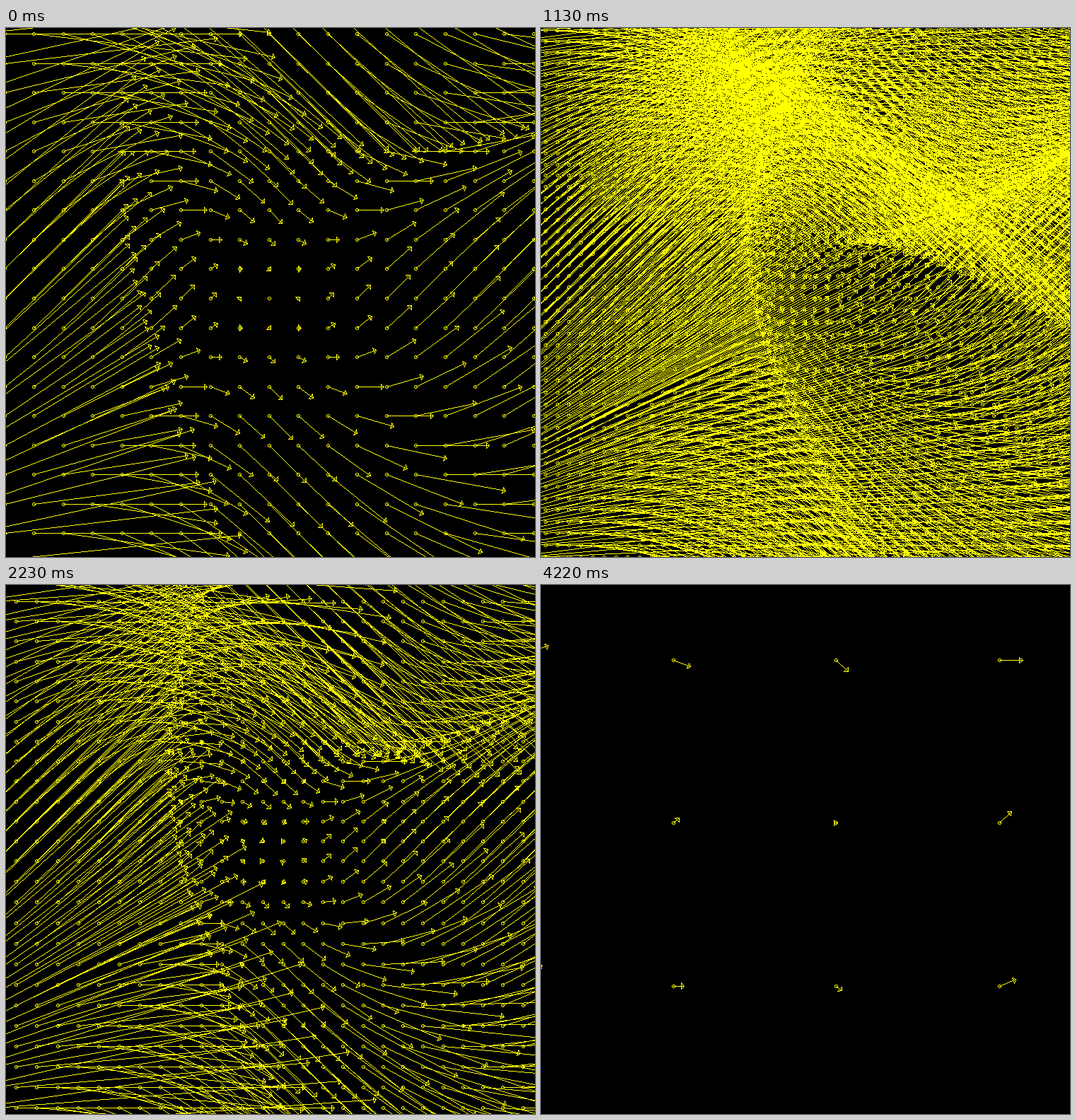
Recreate the animation shown at these times as an HTML page with a canvas. Size 748 px wide and 748 px high, loop 4.44 s.

```html
<!DOCTYPE html>
<html lang="en">
<head>
<meta charset="utf-8">
<title>Vector field</title>
<style>
html, body { margin: 0; width: 100%; height: 100%; overflow: hidden; background: #000; }
canvas { display: block; width: 748px; height: 748px; }
</style>
</head>
<body>
<canvas id="stage" width="748" height="748"></canvas>
<script>
const SIZE = 748, LOOP = 4440;
const SCALE = SIZE / 900;            // pixels per field unit
const CX = 371.7, CY = 382;          // where the field vanishes
const LIMIT = 500, HEAD = 5 * SCALE;
const YELLOW = 0xff00ffff, BLACK = 0xff000000;

// Start time of each picture
const STARTS = [
  0, 120, 230, 350, 460, 570, 670, 790, 910, 1030, 1130, 1230, 1340,
  1450, 1570, 1670, 1790, 1890, 2010, 2120, 2230, 2340, 2450, 2560, 2670, 2770,
  2890, 3000, 3110, 3230, 3330, 3450, 3570, 3670, 3790, 3890, 4000, 4110, 4220
];

// Zoom level (power of 1.1) at a few steps, linear between them
const ZOOM = [[0, 0], [14, -14], [17, -9], [23, 1], [25, 5], [38, 18]];

const ctx = document.getElementById('stage').getContext('2d');
const image = ctx.createImageData(SIZE, SIZE);
const pixels = new Uint32Array(image.data.buffer);

function zoomAt(step) {
  let i = 1;
  while (step > ZOOM[i][0]) i++;
  const [a, from] = ZOOM[i - 1], [b, to] = ZOOM[i];
  return Math.round(from + (to - from) * (step - a) / (b - a));
}

function dot(x, y) {
  if (x >= 0 && y >= 0 && x < SIZE && y < SIZE) pixels[y * SIZE + x] = YELLOW;
}

// Bresenham line without smoothing
function line(ax, ay, bx, by) {
  let x = Math.round(ax), y = Math.round(ay);
  const ex = Math.round(bx), ey = Math.round(by);
  const dx = Math.abs(ex - x), dy = -Math.abs(ey - y);
  const sx = x < ex ? 1 : -1, sy = y < ey ? 1 : -1;
  let err = dx + dy;
  for (;;) {
    dot(x, y);
    if (x === ex && y === ey) return;
    const twice = 2 * err;
    if (twice >= dy) { err += dy; x += sx; }
    if (twice <= dx) { err += dx; y += sy; }
  }
}

function ring(px, py) {
  const x = Math.round(px), y = Math.round(py);
  for (let i = -1; i <= 1; i++) {
    dot(x + i, y - 2);
    dot(x + i, y + 2);
    dot(x - 2, y + i);
    dot(x + 2, y + i);
  }
}

function arrow(x, y, dx, dy) {
  ring(x, y);
  const len = Math.hypot(dx, dy);
  if (!len) return;
  const tx = x + dx, ty = y + dy;
  const ux = dx / len * HEAD, uy = dy / len * HEAD;
  const lx = tx - ux - uy, ly = ty - uy + ux;
  const rx = tx - ux + uy, ry = ty - uy - ux;
  line(x, y, tx, ty);
  line(tx, ty, lx, ly);
  line(tx, ty, rx, ry);
  line(lx, ly, rx, ry);
}

function draw(step) {
  const gap = 50 * Math.pow(1.1, zoomAt(step));
  const k = SCALE / (20 * gap);
  pixels.fill(BLACK);
  // Grid positions snap to whole units, towards zero
  for (let u = -LIMIT; u <= LIMIT; u = Math.trunc(u + gap)) {
    for (let v = -LIMIT; v <= LIMIT; v = Math.trunc(v + gap)) {
      arrow(CX + u * SCALE, CY - v * SCALE, k * (u * u + v * v), k * (v * v - u * u));
    }
  }
  ctx.putImageData(image, 0, 0);
}

let shown = -1;
const begin = performance.now();

function tick() {
  const t = (performance.now() - begin) % LOOP;
  let step = STARTS.length - 1;
  while (STARTS[step] > t) step--;
  if (step !== shown) draw(shown = step);
  requestAnimationFrame(tick);
}
tick();
</script>
</body>
</html>
```
